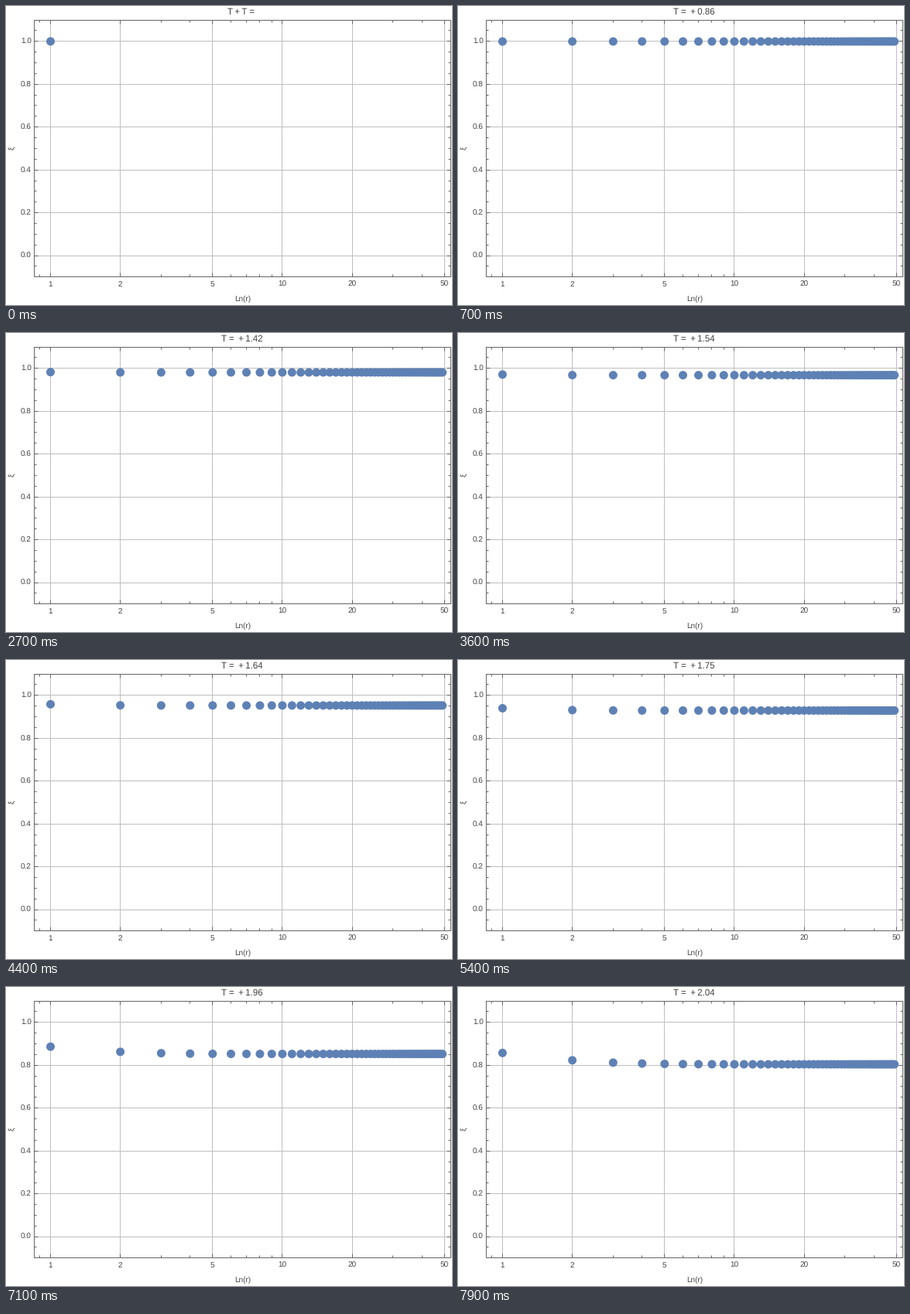
A matplotlib script that plays this animation: 576 by 387 pixels, repeating every 8 s.

```python
import numpy as np
import matplotlib.pyplot as plt
from matplotlib.animation import FuncAnimation
from matplotlib.collections import LineCollection

W, H, DPI = 576, 387, 72          # at 72 dpi one point is one pixel
FRAMES, STEP = 80, 100
LEFT, RIGHT, TOP, BOTTOM = 36.5, 574.5, 18.5, 350.5
DOT, FRAME, GRID, INK = "#5e81b5", "#666666", "#bfbfbf", "#444444"
PLUS = "\u2009+\u2009"            # plus sign between thin spaces

plt.rcParams["font.family"] = ["Liberation Sans", "DejaVu Sans"]
plt.rcParams["text.hinting"] = "none"

# Temperatures crowd together towards the critical point.
KEY_STEP = [1, 3, 6, 10, 16, 20, 27, 44, 63, 71, 79]
KEY_T = [0.33, 0.60, 0.82, 0.99, 1.17, 1.27, 1.42, 1.64, 1.85, 1.96, 2.04]


def px(r):
    return 57.5 + 299.45 * np.log10(r)


def py(v):
    return 323.1 - 277.3 * np.asarray(v)


def crisp(v):
    return np.floor(v) + 0.5


def correlations(t, count=49, samples=1024):
    """Exact spin correlations along a row of the square Ising lattice."""
    z = np.tanh(1 / t)
    q = (1 - z) / (1 + z)
    e = np.exp(2j * np.pi * np.arange(samples) / samples)
    a, b = np.sqrt(1 - z * q * e), np.sqrt(1 - q / z * e)
    symbol = a * b.conj() / (a.conj() * b)
    coef = np.fft.fft(symbol).real / samples
    i = np.arange(count)
    toeplitz = coef[(i[:, None] - i) % samples]
    return [np.linalg.det(toeplitz[:n, :n]) for n in range(1, count + 1)]


fig = plt.figure(figsize=(W / DPI, H / DPI), dpi=DPI, facecolor="white")
ax = fig.add_axes([0, 0, 1, 1])
ax.set(xlim=(0, W), ylim=(H, 0))
ax.axis("off")


def segments(lines, color, z):
    ax.add_collection(LineCollection(lines, colors=color, linewidths=1,
                                     zorder=z, snap=False))


def label(x, y, s, size=10, **kw):
    kw = {"ha": "center", "va": "baseline", "color": INK, **kw}
    return ax.text(x, y, s, fontsize=size, **kw)


x_major = [1, 2, 5, 10, 20, 50]
x_minor = [0.9, 3, 4, 6, 7, 8, 9, 30, 40]
y_major = np.arange(6) / 5
y_minor = [k / 20 for k in range(-1, 22) if k % 4]

grid, ticks = [], []
for values, size in ((x_major, 5), (x_minor, 3)):
    for x in crisp(px(np.array(values))):
        ticks += [[(x, BOTTOM), (x, BOTTOM - size)], [(x, TOP), (x, TOP + size)]]
        if size == 5:
            grid.append([(x, TOP), (x, BOTTOM)])
for values, size in ((y_major, 5), (y_minor, 3)):
    for y in crisp(py(values)):
        ticks += [[(LEFT, y), (LEFT + size, y)], [(RIGHT, y), (RIGHT - size, y)]]
        if size == 5:
            grid.append([(LEFT, y), (RIGHT, y)])
segments(grid, GRID, 1)
segments(ticks, FRAME, 4)
ax.plot([LEFT, RIGHT, RIGHT, LEFT, LEFT], [TOP, TOP, BOTTOM, BOTTOM, TOP],
        color=FRAME, lw=1, zorder=4, solid_joinstyle="miter",
        solid_capstyle="projecting", snap=False)

for r in x_major:
    label(px(r), 363, str(r))
for v in y_major:
    label(33, py(v) + 3.3, f"{v:.1f}", ha="right")
label(305.5, 382, "Ln(r)")
label(7, 183.5, "ξ", rotation=90, va="center")
title = label(305, 11, "", size=11.5)

# Without an edge colour the dots keep their sub-pixel places.
dots = ax.scatter([], [], s=11 ** 2, color=DOT, edgecolors="none", zorder=3)


def draw(n):
    if n == 0:
        xi, text, mid = [1.0], f"T{PLUS}T =", 303.5
    else:
        t = round(float(np.interp(n, KEY_STEP, KEY_T)), 2)
        xi, text, mid = correlations(t), f"T = {PLUS}{t:.2f}", 305
    dots.set_offsets(np.column_stack([px(np.arange(1, len(xi) + 1)), py(xi)]))
    title.set_text(text)
    title.set_x(mid)
    return dots, title


anim = FuncAnimation(fig, draw, frames=FRAMES, interval=STEP, repeat=True,
                     repeat_delay=0, blit=False)
plt.show()
```
